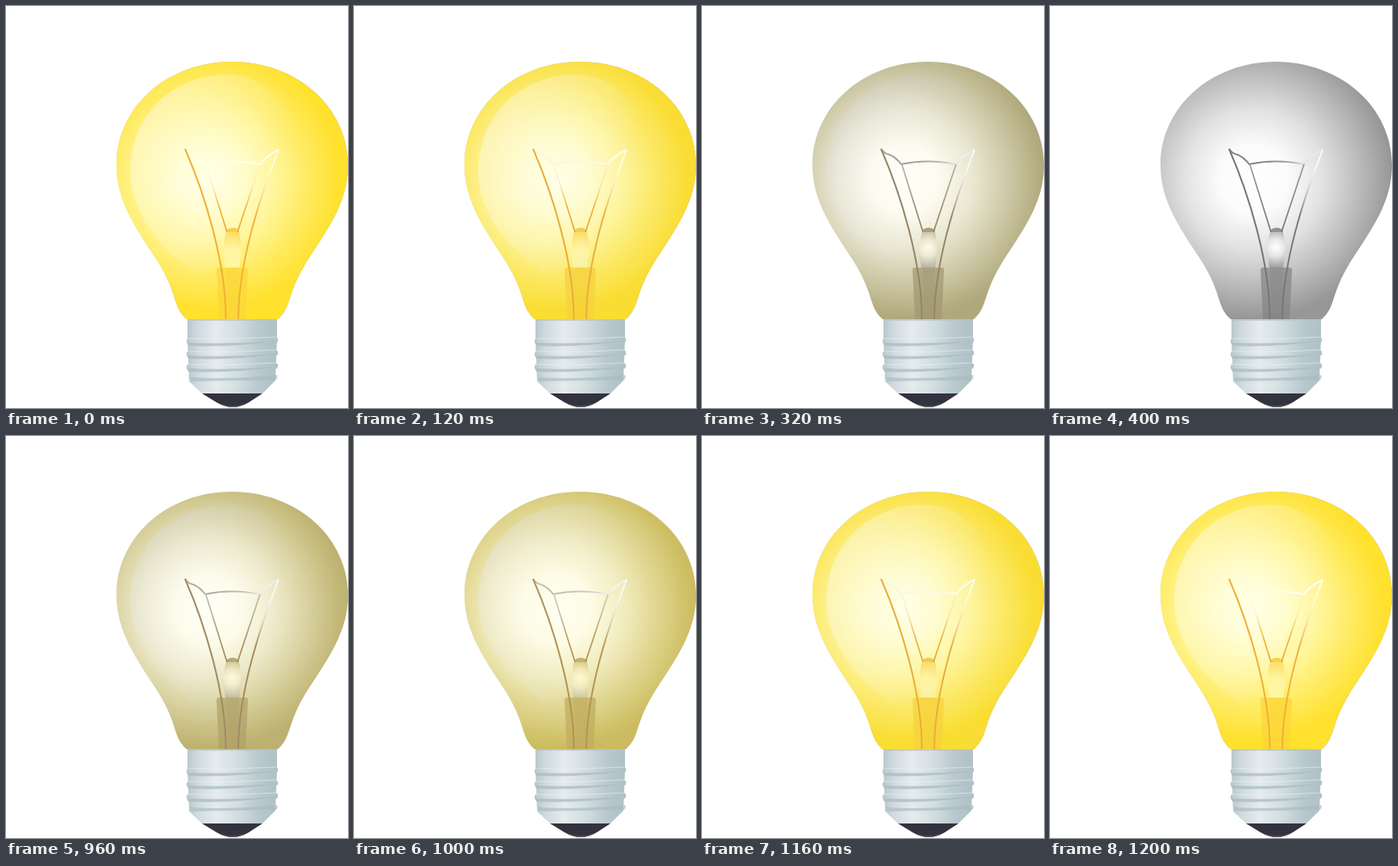
An HTML page for the animation above (1.92 s loop, 424 px wide and 498 px high).

```html
<!DOCTYPE html>
<html lang="en">
<head>
<meta charset="utf-8">
<title>Light bulb</title>
<style>
  html, body { margin: 0; width: 100%; height: 100%; overflow: hidden; background: #fff; }
  svg { display: block; }
</style>
</head>
<body>
<svg id="stage" width="424" height="498" viewBox="0 0 424 498" fill="none"></svg>
<script>
const stage = document.getElementById('stage');

const stops = list => list.map(([at, color, alpha = 1]) =>
  `<stop offset="${at}" stop-color="${color}" stop-opacity="${alpha}"/>`).join('');

const radial = (id, cx, cy, r, list) =>
  `<radialGradient id="${id}" gradientUnits="userSpaceOnUse" cx="${cx}" cy="${cy}" r="${r}">${stops(list)}</radialGradient>`;

const linear = (id, x1, y1, x2, y2, list) =>
  `<linearGradient id="${id}" gradientUnits="userSpaceOnUse" x1="${x1}" y1="${y1}" x2="${x2}" y2="${y2}">${stops(list)}</linearGradient>`;

const glass = 'M280 69C200 69 137 125 137 197C137 243 162 276 188.5 317C214 358 206 372 224 388H337C355 372 347 358 372.5 317C399 276 424 243 424 197C424 125 360 69 280 69Z';
const shine = 'M275 85C207 85 154 135 154 205C154 255 190 300 235 330C310 320 365 260 365 200C365 135 330 85 275 85Z';

// One complete bulb, either dark or lit
function bulb(id, p) {
  const ref = name => `url(#${id}-${name})`;
  return `
  <defs>
    ${radial(id + '-glass', 252, 215, p.reach, p.glass)}
    ${linear(id + '-wire', 222, 0, 330, 0, p.wire)}
    ${linear(id + '-leg', 0, 197, 0, 279, p.leg)}
    ${linear(id + '-post', 0, 178, 0, 260, [[0, '#fff', .85], [.3, '#fff', .65], [1, p.line]])}
    ${radial(id + '-bead', 280, p.beadY, p.beadR, p.bead)}
    ${linear(id + '-shine', 175, 130, 335, 200, [[0, '#fff', .4], [1, '#fff', 0]])}
  </defs>
  <g id="${id}">
    <path d="${glass}" fill="${ref('glass')}"/>
    ${p.shine ? `<path d="${shine}" fill="${ref('shine')}"/>` : ''}
    <path d="M261 327Q261 324 264 324H297Q300 324 300 327L297 388H264Z" fill="${p.stem}" fill-opacity=".7"/>
    <path d="M273 324H289L287 388H275Z" fill="${p.stem}" fill-opacity=".3"/>
    <path d="M274 277Q281 272 288 277Q292 288 291 310L289 324H272L270 310Q269 288 274 277Z" fill="${ref('bead')}"/>
    <path d="M273 280Q274 275 281 275Q288 275 289 280Z" fill="${p.cap}"/>
    <path d="M222 177Q226 183 232 184Q240 187 247 196Q280 189 315 196Q322 186 338 178" stroke="${ref('wire')}" stroke-width="2"/>
    <path d="M248 197L274 280M315 196L287 280" stroke="${ref('leg')}" stroke-width="1.7"/>
    <path d="M222 177C246 232 273 318 272.5 388" stroke="${p.line}" stroke-width="2"/>
    <path d="M338 178C312 244 288 322 288 388" stroke="${ref('post')}" stroke-width="2"/>
  </g>`;
}

const dark = bulb('dark', {
  reach: 172,
  glass: [[0, '#fff'], [.25, '#fbfbfb'], [.5, '#e2e2e3'], [.75, '#bdbdbe'], [1, '#979797']],
  wire: [[0, '#858585'], [.4, '#858585'], [.72, '#aaa'], [.88, '#ddd', .6], [1, '#fff', .2]],
  leg: [[0, '#999'], [1, '#777']],
  beadY: 299, beadR: 27,
  bead: [[0, '#fff'], [.4, '#e6e6e6'], [1, '#969696']],
  stem: '#848484', cap: '#929292', line: '#777'
});

const lit = bulb('lit', {
  shine: true,
  reach: 162,
  glass: [[0, '#ffffe2'], [.25, '#fffdca'], [.5, '#fff69c'], [.75, '#ffeb62'], [1, '#ffe12e']],
  wire: [[0, '#fff', 0], [.4, '#fff', .2], [.75, '#fff', .85], [1, '#fff', .9]],
  leg: [[0, '#f3b53a', 0], [.3, '#f3b53a', .15], [.65, '#f3b53a'], [1, '#eba92f']],
  beadY: 320, beadR: 46,
  bead: [[0, '#fff7a4'], [.45, '#fff4a0'], [1, '#fbd854']],
  stem: '#fdd638', cap: '#f8d050', line: '#f0b038'
});

const thread = y => `
  <path d="M225 ${y + 1}Q280 ${y + 3} 335 ${y - 1}Q339 ${y + 2} 336 ${y + 6}Q285 ${y + 10} 226 ${y + 9}Q222 ${y + 5} 225 ${y + 1}Z" fill="url(#metal)"/>
  <path d="M225 ${y + 6}Q280 ${y + 8} 336 ${y + 4}Q285 ${y + 12} 226 ${y + 10}Z" fill="#a9bcc2" fill-opacity=".75"/>
  <path d="M226 ${y + 1}Q280 ${y + 3} 335 ${y - 1}" stroke="#edf2f3" stroke-opacity=".6"/>`;

const socket = `
  <defs>${linear('metal', 224, 0, 337, 0,
    [[0, '#b7c6cb'], [.12, '#d0dade'], [.32, '#e6ebee'], [.55, '#d3dee1'], [.8, '#b8c8cd'], [1, '#afc1c6']])}</defs>
  <path d="M225 388H336V412L334 464L318 480H243L227 465L225 412Z" fill="url(#metal)"/>
  <path d="M225 389H336" stroke="#b5c3c8" stroke-opacity=".7" stroke-width="2"/>
  ${[411, 427, 443].map(thread).join('')}
  <path d="M228 460Q280 463 336 457Q338 460 335 463Q290 464 230 465Z" fill="#a9bcc2" fill-opacity=".65"/>
  <path d="M243 480H318L301 491Q281 503 261 491Z" fill="#33333f"/>
  <path d="M264 492Q281 499 298 492Q281 502 264 492Z" fill="#565663"/>`;

stage.innerHTML = dark + lit + socket;

const LOOP = 1920, STEP = 40;
const dim = [.98, .95, .85, .7, .53, .38, .24, .1, 0];
const glow = [.36, .5, .64, .77, .88, .95, 1];
const level = (steps, t, start) => steps[Math.min(steps.length - 1, Math.floor((t - start) / STEP))];

function brightness(t) {
  if (t < 80) return 1;
  return t < 960 ? level(dim, t, 80) : level(glow, t, 960);
}

const light = document.getElementById('lit');
const begin = performance.now();
function draw() {
  light.setAttribute('opacity', brightness((performance.now() - begin) % LOOP));
  requestAnimationFrame(draw);
}
draw();
</script>
</body>
</html>
```
